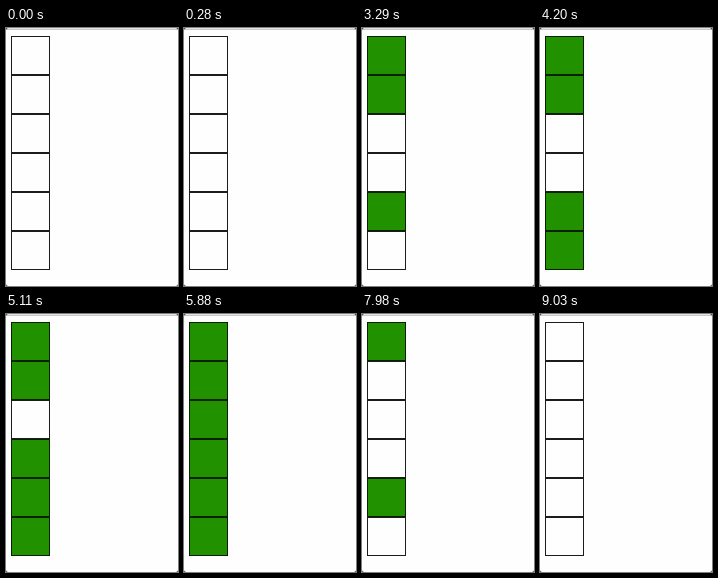
Recreate the animation shown at these times as an HTML page. Size 172 by 258 pixels, loop 9520 ms.

```html
<!DOCTYPE html>
<html lang="en">
<head>
<meta charset="utf-8">
<title>Boxes</title>
<style>
  html, body { margin: 0; width: 100%; height: 100%; overflow: hidden; background: #333; }
  #page {
    position: absolute; inset: 0; box-sizing: border-box;
    background: linear-gradient(#e4e4e4 1px, #c8c8c8 1px 2px, #fefefe 2px);
    border-radius: 2.5px;
  }
  .box {
    position: absolute; left: 5px; width: 39px; height: 39px;
    box-sizing: border-box; border: 1px solid #1c1c1c;
  }
  .on { background: #229100; border-color: #062000; }
</style>
</head>
<body>
<div id="page"></div>
<script>
const LOOP = 9520;
// When each box, from the top down, is filled and cleared again (ms)
const spans = [
  [1750, 9030], [3290, 7980], [5880, 6370],
  [5110, 6930], [2590, 8540], [4200, 7490]
];

const page = document.getElementById('page');
const boxes = spans.map((span, i) => {
  const box = document.createElement('div');
  box.className = 'box';
  box.style.top = 8 + 39 * i + 'px';
  return page.appendChild(box);
});

const start = performance.now();

function draw(now) {
  const t = Math.max(0, now - start) % LOOP;
  spans.forEach(([on, off], i) => boxes[i].classList.toggle('on', t >= on && t < off));
  requestAnimationFrame(draw);
}
draw(start);
</script>
</body>
</html>
```
